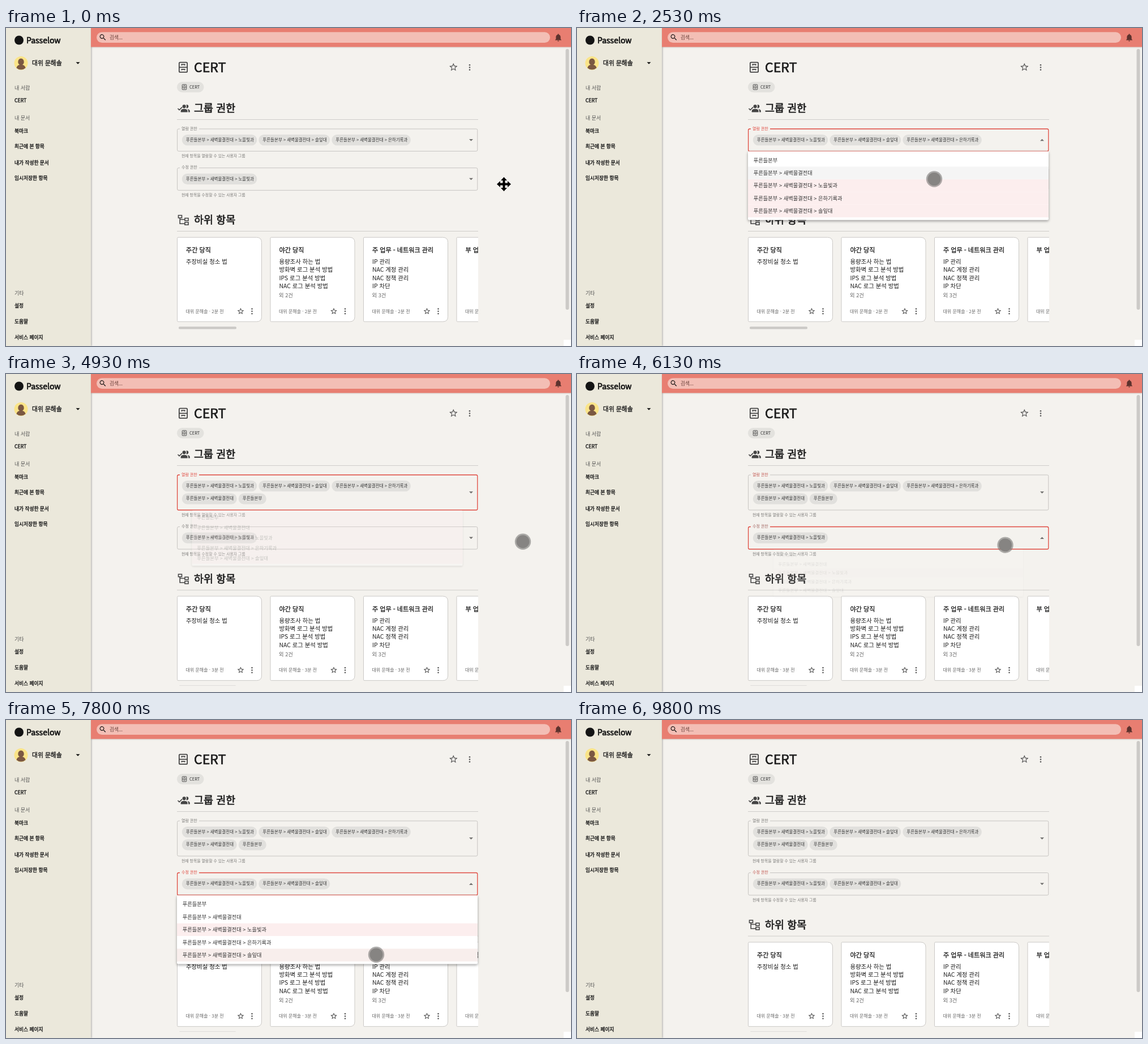
An HTML page that plays this animation: 998 by 561 pixels, repeating every 9.87 s.

```html
<!DOCTYPE html>
<html lang="ko">
<head>
<meta charset="utf-8">
<title>그룹 권한</title>
<style>
  html, body { margin: 0; width: 100%; height: 100%; overflow: hidden; background: #f4f2ee; }
  svg { display: block; }
  text { font-family: "Noto Sans CJK KR", "Noto Sans CJK JP", "Noto Sans CJK", sans-serif; white-space: pre; }
  .menu { filter: drop-shadow(0 2.5px 2px rgba(0, 0, 0, .26)) drop-shadow(0 1px 2.5px rgba(0, 0, 0, .14)); }
  .side { filter: drop-shadow(1px 0 1.5px rgba(0, 0, 0, .3)); }
  .bar { filter: drop-shadow(0 1px 1px rgba(0, 0, 0, .12)); }
</style>
</head>
<body>
<svg id="stage" width="998" height="561" viewBox="0 0 998 561"></svg>
<script>
const TICK = 200 / 3, LOOP = 9870;
const RED = '#e04a40', INK = '#1c1c1c', GREY = '#7b7a78', LINE = '#c6c4c1', PAGE = '#f4f2ee';
const USER = '대위 문해솔';
const ROOT = '푸른들본부', UNIT = ROOT + ' > 새벽물결전대';
const GROUPS = [ROOT, UNIT, UNIT + ' > 노을빛과', UNIT + ' > 은하기록과', UNIT + ' > 솔잎대'];

// ---- drawing helpers ----
// y is the optical middle of the line; heavy thickens the strokes to a medium weight
const text = (x, y, size, str, fill = INK, heavy = 0) =>
  `<text x="${x}" y="${y + size * .37}" font-size="${size}" fill="${fill}"` +
  (heavy ? ` stroke="${fill}" stroke-width="${size * heavy}"` : '') + `>${str}</text>`;
const rect = (x, y, w, h, fill, r = 0, more = '') =>
  `<rect x="${x}" y="${y}" width="${w}" height="${h}" rx="${r}" fill="${fill}" ${more}/>`;
const circle = (x, y, r, fill, more = '') => `<circle cx="${x}" cy="${y}" r="${r}" fill="${fill}" ${more}/>`;
const stroke = (d, color, width) => `<path d="${d}" fill="none" stroke="${color}" stroke-width="${width}"/>`;
const icon = (x, y, size, d, fill) =>
  `<path transform="translate(${x - size / 2} ${y - size / 2}) scale(${size / 24})" d="${d}" fill="${fill}"/>`;
const shift = (x, y, body) => `<g transform="translate(${x} ${y})">${body}</g>`;

const STAR = 'M22 9.24l-7.19-.62L12 2 9.19 8.63 2 9.24l5.46 4.73L5.82 21 12 17.27 18.18 21l-1.63-7.03zM12 15.4l-3.76 2.27 1-4.28-3.32-2.88 4.38-.38L12 6.1l1.71 4.04 4.38.38-3.32 2.88 1 4.28z';
const BELL = 'M12 22c1.1 0 2-.9 2-2h-4c0 1.1.9 2 2 2zm6-6v-5c0-3.07-1.64-5.64-4.5-6.32V4a1.5 1.5 0 0 0-3 0v.68C7.63 5.36 6 7.92 6 11v5l-2 2v1h16v-1z';
const LENS = 'M15.5 14h-.79l-.28-.27A6.5 6.5 0 1 0 13.73 14.43l.27.28v.79l5 4.99L20.49 19zm-6 0a4.5 4.5 0 1 1 0-9 4.5 4.5 0 0 1 0 9z';

const dots = (x, y, gap, r) => [-gap, 0, gap].map(d => circle(x, y + d, r, '#555')).join('');
const arrow = (x, y, up, fill = '#6f6e6c') => {
  const s = up ? -1 : 1;
  return `<path d="M${x - 3.5} ${y - 1.7 * s}h7l-3.5 ${3.5 * s}z" fill="${fill}"/>`;
};
const cabinet = (x, y, s) => `<g transform="translate(${x} ${y}) scale(${s})">` +
  stroke('M-5.2-8.2h10.4q1.6 0 1.6 1.6v13.2q0 1.6-1.6 1.6h-10.4q-1.6 0-1.6-1.6v-13.2q0-1.6 1.6-1.6zM-6.8 0H6.8M-2.6-3.2V-4.6H2.6V-3.2M-2.6 5V3.6H2.6V5', '#444', 1.7) + '</g>';

// ---- parts that never change ----
const sideItem = ([y, str]) => text(15, y, 8.7, str, INK, .045);
const sideHead = ([y, str]) => text(15, y, 9, str, '#555');
const frame =
  rect(0, 0, 150, 561, '#ebe8db', 0, 'class="side"') +
  rect(150, 0, 848, 33.5, '#e87e71', 0, 'class="bar"') +
  rect(160, 7.3, 801, 18.8, '#f3beb5', 9.4) +
  icon(171, 16.5, 14.5, LENS, '#111') + text(183, 16.5, 8.6, '검색...', '#80564f', .02) +
  icon(975.5, 16.8, 16.5, BELL, '#5d322d') +
  circle(23, 21.5, 8, '#141414') + text(36, 21.5, 14, 'Passelow', '#141414', .05) +
  circle(26.5, 62, 12, '#fae488') +
  `<path d="M18.5 70.5q1-5 5.5-5.5a5.3 6 0 1 1 5 0q4.500 .5 5.500 5.500a12 12 0 0 1-16 0z" fill="#7b5842"/>` +
  text(46, 62, 10.8, USER, INK, .03) + arrow(127, 62, 0, '#111') +
  [[105.5, '내 서랍'], [159, '내 문서'], [468, '기타']].map(sideHead).join('') +
  [[128, 'CERT'], [181.5, '북마크'], [209, '최근에 본 항목'], [237.5, '내가 작성한 문서'], [265, '임시저장한 항목'],
   [490, '설정'], [518, '도움말'], [546, '서비스 페이지']].map(sideItem).join('');

const heading =
  cabinet(313, 69.3, 1.05) + text(332, 69, 23.1, 'CERT', INK, .03) +
  icon(790.3, 69, 17.5, STAR, '#555') + dots(819, 69.5, 4.3, 1.3) +
  rect(302, 95, 47.5, 18.5, '#e3e2de', 9.25) + cabinet(315, 104.2, .55) + text(324, 104, 7.5, 'CERT', '#333') +
  stroke('M303.500 142l2.600 2.600 5-5', '#444', 1.600) +
  circle(314.7, 138.3, 3.1, '#444') + '<path d="M308.700 148.500v-2q0-3.500 6-3.700 6 .2 6 3.700v2z" fill="#444"/>' +
  '<path d="M318.500 135.300a3.100 3.100 0 1 1 0 6q1.400-3 0-6zM320.500 143q4.300.7 4.300 3.500v2h-2.700v-2q0-2.200-1.600-3.500z" fill="#444"/>' +
  text(332, 141, 18.5, '그룹 권한', INK, .035) + rect(302, 161, 532, 1, '#cfcdca');

const CARDS = [
  ['주간 당직', ['주장비실 청소 법']],
  ['야간 당직', ['용량조사 하는 법', '방화벽 로그 분석 방법', 'IPS 로그 분석 방법', 'NAC 로그 분석 방법'], 2],
  ['주 업무 - 네트워크 관리', ['IP 관리', 'NAC 계정 관리', 'NAC 정책 관리', 'IP 차단'], 3],
  ['부 업무', []]
];

function card([title, lines, more], i, minutes) {
  return shift(302.5 + i * 164.5, 369.3,
    `<path d="M1.500 0H140q9 0 9 9V140q0 8.700-8.700 8.700H1.500q-1.500 0-1.500-1.500V1.500q0-1.500 1.500-1.500z" fill="#fff" stroke="#cbc9c6"/>` +
    text(15.5, 22.5, 11.1, title, INK, .025) +
    lines.map((s, n) => text(15.5, 43 + n * 14.3, 10.4, s)).join('') +
    (more ? text(15, 102.7, 9.3, `외 ${more}건`, '#666') : '') +
    text(15, 130.5, 8, `${USER} · ${minutes}분 전`, '#666') +
    icon(112, 130.3, 14, STAR, '#444') + dots(132, 130.5, 4.2, 1.25));
}

const children = (dy, minutes) =>
  `<svg x="302" y="0" width="532" height="550" viewBox="302 0 532 550">` + shift(0, dy,
    stroke('M304.500 330.500h6v4.500h-6zM316 335.500h6v4.500h-6zM316 342.800h6v4.500h-6zM307.200 335V345.300H316M307.200 337.800H316', '#444', 1.600) +
    text(332, 338.3, 18.5, '하위 항목', INK, .035) + rect(302, 358, 532, 1, '#cfcdca') +
    CARDS.map((c, i) => card(c, i, minutes)).join('') +
    rect(305, 526.8, 102, 4.4, '#cccac7', 2)) + '</svg>';

// ---- select fields and their menus ----
const CHIP_W = [49, 97, 132.5, 139.5, 126];

function field(y, h, label, help, rows, focus, on, open) {
  let chips = '';
  rows.forEach((row, r) => {
    let x = 310.8;
    for (const g of row) {
      chips += rect(x, y + 10 + r * 22.5, CHIP_W[g], 19.3, '#e1e0dd', 9.6) +
        text(x + 7, y + 19.2 + r * 22.3, 7.5, GROUPS[g], '#333');
      x += CHIP_W[g] + 3;
    }
  });
  return rect(302.6, y, 530.2, h, 'none', 2.3, `stroke="${on ? RED : LINE}" stroke-width="${on ? 1.3 : 1}"`) +
    rect(307, y - 2, 34, 4, PAGE) +
    text(310, y - 1, 7, label, `color-mix(in srgb, ${RED} ${focus * 100}%, ${GREY})`) +
    chips + arrow(821.5, y + h / 2, open) +
    text(310, y + h + 8, 6.88, help, GREY);
}

const clamp = v => Math.max(0, Math.min(1, v));
const ease = v => (v = clamp(v), v * v * (3 - 2 * v));
const focusLevel = (k, on, off) => k >= off ? clamp(.7 - .35 * (k - off)) : k >= on ? clamp(.4 + .3 * (k - on)) : 0;

// [growth, opacity] for the first ticks of opening and closing
const GROW = [[.32, .1], [.75, .45], [.97, .85]], SHRINK = [[.97, .9], [.82, .6], [.6, .25]];
const ROW = 22.4, PAD = 4.6;

function menu(k, top, on, off, chosen, clicks, pos) {
  if (k < on || k >= off + 3) return '';
  const [p, alpha] = k >= off ? SHRINK[k - off] : GROW[k - on] || [1, 1];
  const s = .75 + .25 * p;
  const inside = pos[0] > 302 && pos[0] < 833;
  const hover = inside ? Math.floor((pos[1] - top - PAD) / ROW) : -1;
  const items = GROUPS.map((g, i) => {
    const picked = chosen.includes(i), over = i === hover;
    const fill = picked ? (over ? '#f8eeec' : '#fceeee') : over ? '#f5f5f5' : '#fff';
    const y = PAD + i * ROW;
    const click = clicks.find(c => c[0] === i && k >= c[1] && k < c[1] + 8);
    let ripple = '';
    if (click) {
      const q = (k - click[1] + .5) / 8;
      ripple = `<svg x="0" y="${y}" width="531" height="${ROW}">` +
        circle(click[2] - 302, ROW / 2, 340 * ease(q), '#000', `opacity="${.2 * (1 - q) ** 2}"`) + '</svg>';
    }
    return rect(0, y, 531, ROW, fill) + ripple + text(9.8, y + 11, 9.25, g, '#333');
  }).join('');
  return `<g opacity="${alpha}" transform="translate(567.5 ${top}) scale(${s} ${p < 1 ? s * s : 1}) translate(-265.5 0)">` +
    `<g class="menu">${rect(0, 0, 531, PAD * 2 + ROW * 5, '#fff', 2)}</g>${items}</g>`;
}

// ---- pointer: [from tick, to tick, x, y] ----
const MOVES = [
  [16, 26, 686, 210], [32, 38, 631, 266.5], [39, 40, 631, 267.3], [52, 56, 630, 257], [61, 67, 913, 295.7],
  [74, 79, 853, 330], [81, 88, 756.5, 301.7], [96, 102, 655, 425], [102, 105, 654, 414],
  [119, 127, 891.5, 366.5], [139, 146, 200, 490.5]
];

function pointerAt(k) {
  let x = 868.7, y = 273;
  for (const [a, b, nx, ny] of MOVES) {
    const e = ease((k - a) / (b - a));
    x += (nx - x) * e;
    y += (ny - y) * e;
  }
  return [x, y];
}

function pointer(k, [x, y]) {
  if (k >= 147) return '';
  if (k >= 11) return circle(x, y, 14.2, '#767472', 'opacity=".58"') + circle(x, y, 11.5, '#868482');
  const arms = [0, 90, 180, 270].map(a =>
    `<path transform="rotate(${a})" d="M0-12.500L5.500-6.500H2V2H-2V-6.500H-5.500z"/>`).join('');
  return shift(879.5 - 7 * clamp((k - 3) / 3), 275.5, arms);
}

function scene(k) {
  const grown = k >= 44, dy = grown ? 22.7 : 0, pos = pointerAt(k);
  const read = [[2, 4, 3]], edit = [2];
  if (grown) read.push([1]);
  if (k >= 60) read[1].push(0);
  if (k >= 109) edit.push(4);
  const open1 = k >= 29 && k < 72, open2 = k >= 92 && k < 131;
  return rect(0, 0, 998, 561, PAGE) + heading +
    field(178, 39.3 + dy, '열람 권한', '현재 항목을 열람할 수 있는 사용자 그룹', read, focusLevel(k, 29, 92), k >= 29 && k < 92, open1) +
    field(246.8 + dy, 39.5, '수정 권한', '현재 항목을 수정할 수 있는 사용자 그룹', [edit], focusLevel(k, 92, 147), k >= 92 && k < 147, open2) +
    children(dy, grown ? 3 : 2) + frame +
    rect(988.5, 37, 6, grown ? 443 : 460, '#cccac7', 3) + rect(985, 550, 13, 11, '#fff') +
    menu(k, 217.5 + dy, 29, 72, read.flat(), [[1, 44, 631], [0, 60, 630]], pos) +
    menu(k, 309.3, 92, 131, edit, [[4, 109, 654]], pos) +
    pointer(k, pos);
}

const stage = document.getElementById('stage'), start = performance.now();
let shown = -1;
function play() {
  const k = Math.min(147, Math.floor(((performance.now() - start) % LOOP + 4) / TICK));
  if (k !== shown) stage.innerHTML = scene(shown = k);
  requestAnimationFrame(play);
}
play();
</script>
</body>
</html>
```
